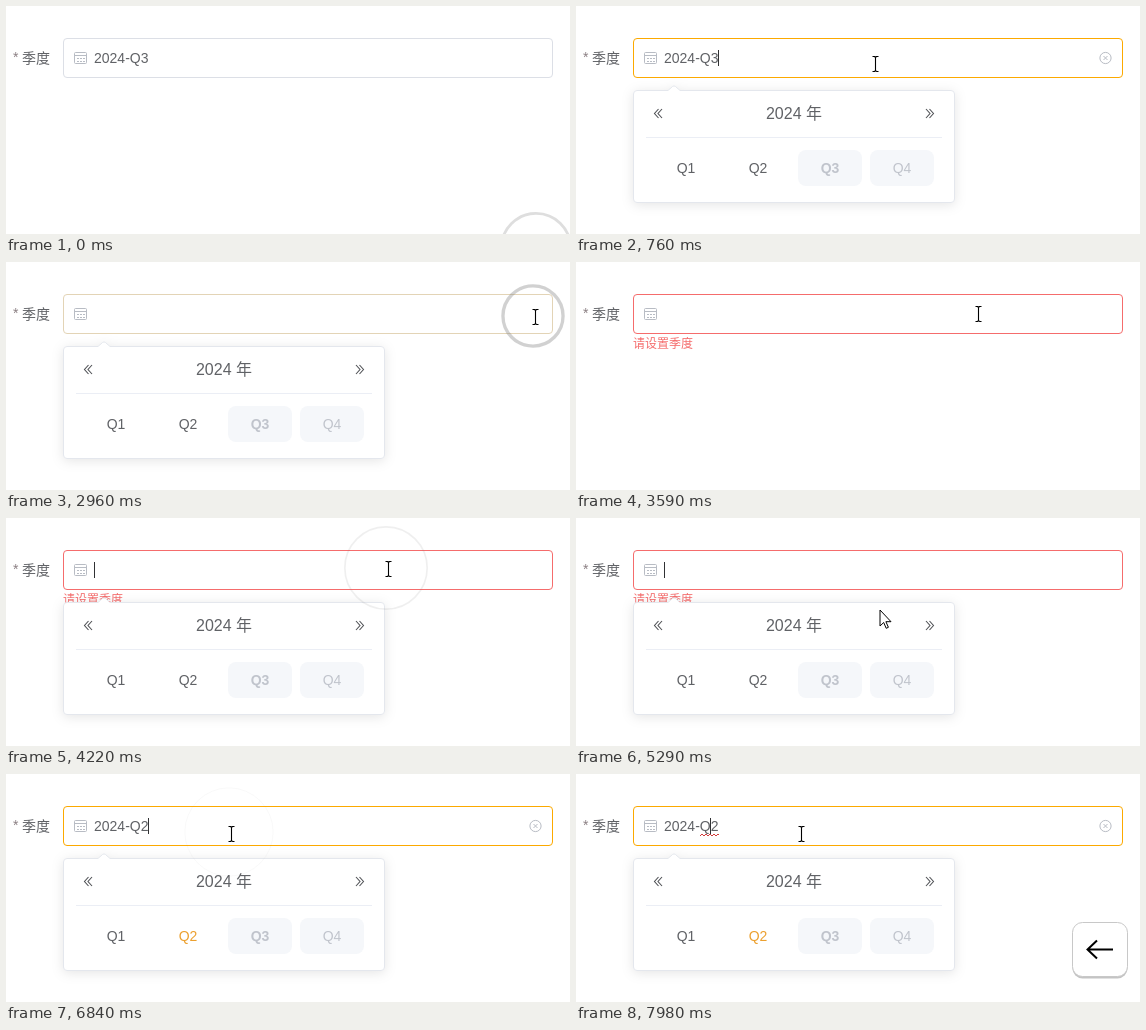
These frames come from a looping animation (564x228 px, 8 s). An HTML page:

```html
<!DOCTYPE html>
<html lang="zh-CN">
<head>
<meta charset="utf-8">
<title>季度</title>
<style>
html, body { margin: 0; width: 100%; height: 100%; overflow: hidden; background: #fff; }
svg { display: block; width: 564px; height: 228px; }
text { font: 14px "Liberation Sans", Arial, "Noto Sans CJK SC", "Noto Sans CJK", sans-serif; fill: #606266; white-space: pre; }
.mid { text-anchor: middle; }
.off { fill: #c0c4cc; }
.line { fill: none; stroke: #b8bcc4; }
#card { filter: drop-shadow(0 2px 6px rgba(0, 0, 0, .1)); }
</style>
</head>
<body>
<svg viewBox="0 0 564 228">
  <text x="7" y="56" style="fill:#8c8084">*</text>
  <text x="16" y="56.5">季度</text>
  <rect id="field" x="57.5" y="32.5" width="489" height="39" rx="3.5" fill="#fff"/>
  <g class="line">
    <rect x="68.5" y="46.5" width="12" height="11" rx="1"/>
    <path d="M68 49.5h13"/>
    <path d="M71 52.5h8M71 55.5h8" stroke-dasharray="2 1"/>
  </g>
  <text id="value" x="88" y="57"></text>
  <path id="squiggle" fill="none" stroke="#d23c3c" d="M124 62l2-2 2 2 2-2 2 2 2-2 2 2 2-2 2 2 2-2 1 1"/>
  <rect id="caret" y="44" width="1" height="16" fill="#303133"/>
  <g id="clear" class="line">
    <circle cx="529.5" cy="52" r="5.6"/>
    <path d="M527.5 50l4 4M531.5 50l-4 4"/>
  </g>
  <text id="error" x="57" y="86" style="font-size:12px;fill:#f56c6c">请设置季度</text>

  <g id="popup">
    <g id="card">
      <path d="M61 84.5H92l4.5-4q1.5-1.2 3 0l4.5 4H375q3.5 0 3.5 3.5V193q0 3.5-3.5 3.5H61q-3.5 0-3.5-3.5V88q0-3.5 3.5-3.5z" fill="#fff" stroke="#e4e7ed"/>
    </g>
    <path d="M82.5 103l-4 4.500 4 4.500M86 103l-4 4.500 4 4.500M350 103l4 4.500-4 4.500M353.500 103l4 4.500-4 4.500" fill="none" stroke="#505256" stroke-width="1.100"/>
    <text class="mid" x="218" y="113" style="font-size:16px">2024 年</text>
    <path d="M70 131.5H366" stroke="#ebeef5"/>
    <rect x="222" y="144" width="64" height="36" rx="8" fill="#f5f7fa"/>
    <rect x="294" y="144" width="64" height="36" rx="8" fill="#f5f7fa"/>
    <text class="mid" x="110" y="167">Q1</text>
    <text class="mid" id="q2" x="182" y="167">Q2</text>
    <text class="mid off" x="254" y="167" style="font-weight:bold">Q3</text>
    <text class="mid off" x="326" y="167">Q4</text>
  </g>

  <g id="key">
    <rect x="496.5" y="149.5" width="55" height="55" rx="10" fill="#c4c4c4"/>
    <rect x="496.5" y="148.5" width="55" height="54" rx="10" fill="#fff" stroke="#c8c8c8"/>
    <path d="M537 175.5H512M521 166.5l-9.5 9 9.5 9" fill="none" stroke="#000" stroke-width="2"/>
  </g>

  <circle id="ring" fill="none" stroke="#808080"/>
  <g id="cursor">
    <path id="beam" d="M-3 -7.5H-1M1 -7.5H3M-1 -7.5L0 -6.5 1 -7.5M0 -7V7M-3 7.5H-1M1 7.5H3M-1 7.5L0 6.5 1 7.5" transform="translate(.5 0)" fill="none" stroke="#000" stroke-width="1.1"/>
    <path id="arrow" d="M0 0V16l3.7-3.5 2.5 5.8 2.2-1-2.5-5.6H11z" fill="#fff" stroke="#000"/>
    <path id="hand" d="M-1.5 9V1q1.5-2 3 0V6l7 1.5q1.5.5 1.5 2V13l-2 5H0l-5-7q0-2 2-1.5l1.5 1.5z" fill="#fff" stroke="#000"/>
  </g>
</svg>
<script>
const LOOP = 8000;
const ORANGE = [252, 169, 0], GREY = [220, 223, 230], HOVER = [192, 196, 204], RED = [245, 108, 108];
const el = {};
document.querySelectorAll('[id]').forEach(e => el[e.id] = e);

const unit = v => Math.max(0, Math.min(1, v));
const out = (v, n) => 1 - (1 - unit(v)) ** n;
const smooth = v => v * v * (3 - 2 * v);
const set = (e, attrs) => { for (const k in attrs) e.setAttribute(k, attrs[k]); };
const show = (e, amount) => set(e, { opacity: Number(amount) });
const within = (t, a, b) => t >= a && t < b;

// start, end, x, y, bow of the path
const moves = [
  [60, 390, 299, 58, 0],
  [1700, 1980, 529, 55, 13],
  [3200, 3710, 382, 51, 0],
  [5210, 5400, 182, 157, 0],
  [5580, 5860, 225, 60, 0]
];
// press time, x, y
const clicks = [
  [-242, 530, 242], [410, 297, 57], [2750, 527, 54],
  [3932, 380, 50], [5425, 180, 156], [6531, 223, 58]
];
const borders = [[-999, GREY], [405, ORANGE], [2880, GREY], [3000, RED], [5480, GREY], [5690, HOVER], [6531, ORANGE]];
const opened = [[425, 2995], [3932, 5490], [6531, 9999]];
// focus, blur
const focus = [[405, 2850], [3932, 5480], [6531, 7860], [7860, 9999]];

function pointer(t) {
  let x = 532, y = 242;
  for (const [a, b, tx, ty, bow] of moves) {
    if (t < a) break;
    const u = unit((t - a) / (b - a)), e = smooth(u);
    x += (tx - x) * e;
    y += (ty - y) * e + bow * Math.sin(Math.PI * u);
  }
  return [x, y];
}

function border(t) {
  const i = borders.findLastIndex(b => b[0] <= t);
  const [start, to] = borders[i], from = borders[Math.max(0, i - 1)][1];
  const u = out((t - start) / 200, 3);
  return `rgb(${to.map((c, k) => Math.round(from[k] + (c - from[k]) * u))})`;
}

function draw(t) {
  const [x, y] = pointer(t);
  const open = Math.max(...opened.map(([a, b]) => out((t - a) / 300, 4) * (1 - out((t - b) / 300, 4))));
  const inField = within(x, 57, 547) && within(y, 32, 72);
  const onQ2 = open > .5 && within(x, 150, 214) && within(y, 144, 180);
  const value = t < 2850 ? '2024-Q3' : t < 5480 ? '' : '2024-Q2';

  set(el.field, { stroke: border(t) });
  el.value.textContent = value;
  show(el.clear, inField && value !== '');
  show(el.squiggle, within(t, 1230, 2850) || t >= 7540);
  show(el.error, out((t - 3000) / 300, 4) * (t < 5480));

  show(el.caret, focus.some(([a, b]) => within(t, a, b) && (t - a) % 1060 < 530));
  set(el.caret, { x: !value ? 88 : t < 7860 ? 142 : 134 });

  show(el.popup, open);
  set(el.popup, { transform: `translate(0 ${84 * (1 - open)}) scale(1 ${open})` });
  el.q2.style.fill = onQ2 || t >= 5480 ? '#eca02f' : '';
  show(el.key, unit((t - 7850) / 100));

  const [press, cx, cy] = clicks.findLast(c => c[0] <= t);
  const grow = unit((t - press) / 330);
  set(el.ring, { cx, cy, r: 47 * grow, 'stroke-width': 4 * (1 - grow ** 4), opacity: 1 - grow });

  set(el.cursor, { transform: `translate(${Math.round(x)} ${Math.round(y)})` });
  show(el.beam, inField);
  show(el.hand, onQ2);
  show(el.arrow, !inField && !onQ2);
}

const begin = performance.now();
function tick(now) {
  draw(Math.max(0, now - begin) % LOOP);
  requestAnimationFrame(tick);
}
draw(0);
requestAnimationFrame(tick);
</script>
</body>
</html>
```
